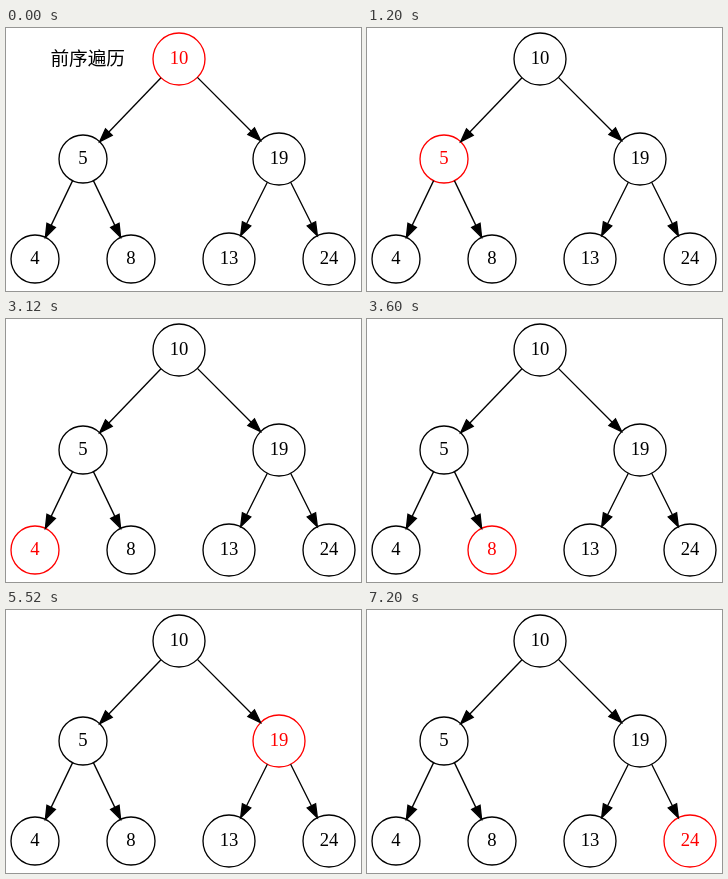
Write an HTML page with a canvas that moves like this. It is 355 px wide and 263 px high and loops after 8.4 s.

```html
<!DOCTYPE html>
<html lang="zh-CN">
<head>
<meta charset="utf-8">
<title>Preorder traversal</title>
<style>
  html, body { margin: 0; width: 355px; height: 263px; overflow: hidden; background: #fff; }
  canvas { display: block; }
</style>
</head>
<body>
<canvas id="stage" width="355" height="263"></canvas>
<script>
const ctx = document.getElementById('stage').getContext('2d');
const STEP = 1200;
const PT = 4 / 3; // 96 dpi pixels per point
const FONT_SIZE = 14 * PT;

const node = (value, x, y, r, ...children) => ({ value, x, y, r, children });
const tree =
  node(10, 173, 31, 26,
    node(5, 77, 131, 24,
      node(4, 29, 231, 24),
      node(8, 125, 231, 24)),
    node(19, 273, 131, 26,
      node(13, 223, 231, 26),
      node(24, 323, 231, 26)));

const preorder = n => [n, ...n.children.flatMap(preorder)];
const order = preorder(tree);

function drawNode(n, active) {
  ctx.strokeStyle = ctx.fillStyle = active ? '#f00' : '#000';
  ctx.beginPath();
  ctx.arc(n.x, n.y, n.r, 0, Math.PI * 2);
  ctx.stroke();
  ctx.font = `${FONT_SIZE}px "Liberation Serif", "Times New Roman", serif`;
  ctx.fillText(n.value, n.x, n.y + 5);
}

function drawEdge(from, to) {
  const dx = to.x - from.x, dy = to.y - from.y;
  const length = Math.hypot(dx, dy);
  const tip = length - to.r;
  const base = tip - 10 * PT;
  const half = 3.5 * PT;

  ctx.save();
  ctx.translate(from.x, from.y);
  ctx.rotate(Math.atan2(dy, dx));
  ctx.strokeStyle = ctx.fillStyle = '#000';
  ctx.beginPath();
  ctx.moveTo(from.r, 0);
  ctx.lineTo(base, 0);
  ctx.stroke();
  ctx.beginPath();
  ctx.moveTo(tip, 0);
  ctx.lineTo(base, half);
  ctx.lineTo(base, -half);
  ctx.closePath();
  ctx.fill();
  ctx.stroke();
  ctx.restore();
}

function drawTitle() {
  ctx.fillStyle = '#000';
  ctx.font = `300 ${FONT_SIZE}px "AR PL UKai CN", KaiTi, "Noto Sans CJK SC", "Noto Sans CJK", sans-serif`;
  ctx.fillText('前序遍历', 81.7, 36.5);
}

function draw(step) {
  ctx.fillStyle = '#fff';
  ctx.fillRect(0, 0, 355, 263);
  ctx.lineWidth = PT;
  ctx.textAlign = 'center';
  ctx.textBaseline = 'alphabetic';
  order.forEach((n, i) => drawNode(n, i === step));
  order.forEach(n => n.children.forEach(child => drawEdge(n, child)));
  if (step === 0) drawTitle();
}

let start;
function tick(now) {
  start ??= now;
  draw(Math.floor((now - start) / STEP) % order.length);
  requestAnimationFrame(tick);
}
draw(0);
requestAnimationFrame(tick);
</script>
</body>
</html>
```
